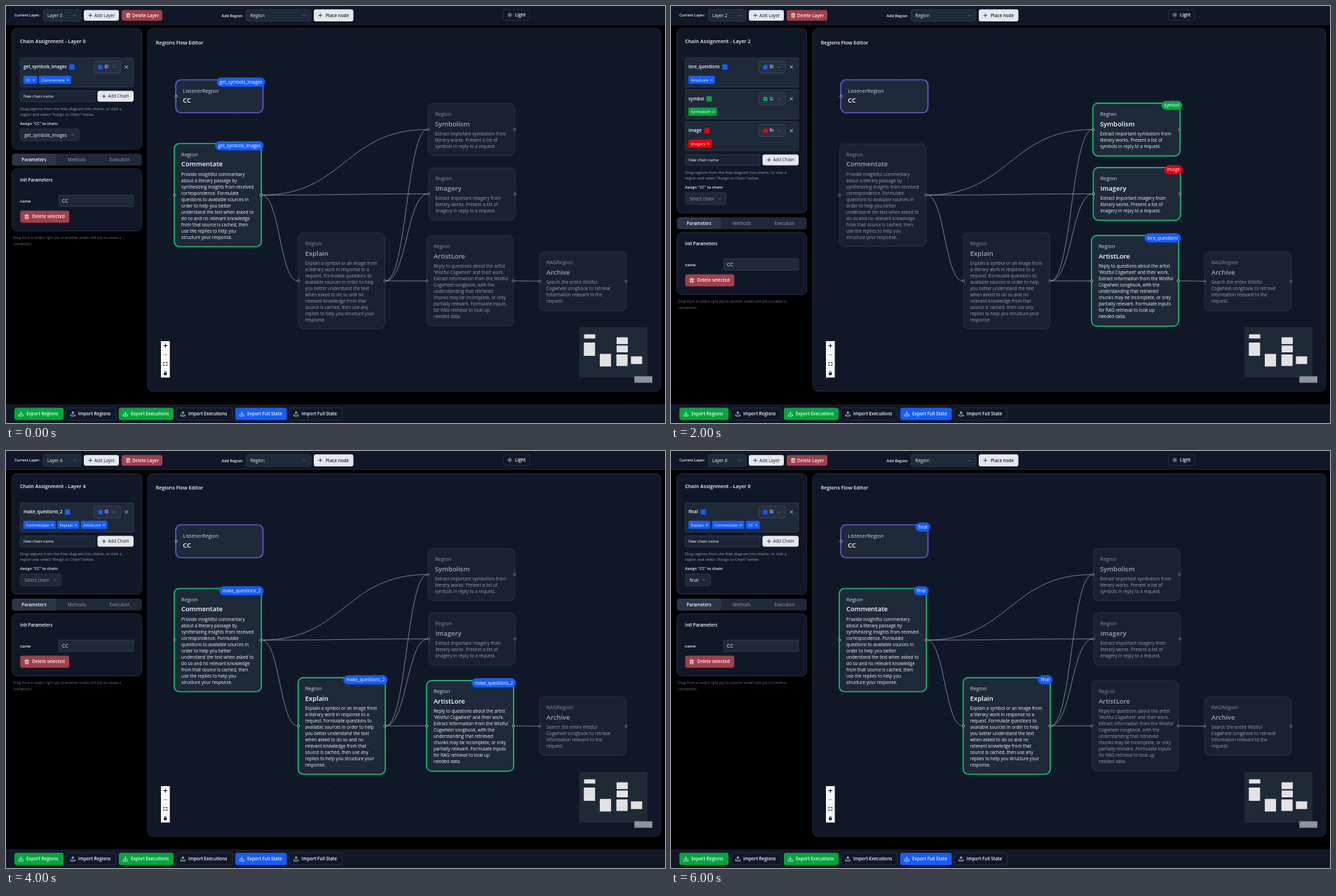
These frames come from a looping animation (940x596 px, 7 s). An HTML page with a canvas:

```html
<!DOCTYPE html>
<html lang="en">
<head>
<meta charset="utf-8">
<title>Regions Flow Editor</title>
<style>
html, body { margin: 0; width: 100%; height: 100%; overflow: hidden; background: #000; }
canvas { display: block; width: 940px; height: 596px; }
</style>
</head>
<body>
<canvas id="stage"></canvas>
<script>
const W = 940, H = 596, LAYER_MS = 1000;
const canvas = document.getElementById('stage');
const dpr = window.devicePixelRatio || 1;
canvas.width = W * dpr;
canvas.height = H * dpr;
const ctx = canvas.getContext('2d');

const C = {
  panel: '#101828', card: '#1e2939', line: '#364153', dim: '#1e2939', field: '#1b2536',
  text: '#f3f4f6', muted: '#99a1af', light: '#e5e7eb', ink: '#1a2230', danger: '#a23f4a',
  blue: '#155dfc', green: '#00a63e', red: '#e7000b', active: '#14bf6c', selected: '#5b5bd6'
};

const nodes = {
  CC: { type: 'ListenerRegion', x: 242.7, y: 106, w: 123.3, h: 46, body: [] },
  Commentate: { type: 'Region', x: 240.5, y: 197, w: 123.3, h: 146.5, body: [
    'Provide insightful commentary', 'about a literary passage by', 'synthesizing insights from received',
    'correspondence. Formulate', 'questions to available sources in', 'order to help you better',
    'understand the text when asked to', 'do so and no relevant knowledge', 'from that source is cached, then',
    'use the replies to help you', 'structure your response.'] },
  Explain: { type: 'Region', x: 417.2, y: 324.3, w: 123.3, h: 137.2, body: [
    'Explain a symbol or an image from', 'a literary work in response to a', 'request. Formulate questions to',
    'available sources in order to help', 'you better understand the text', 'when asked to do so and no',
    'relevant knowledge from that', 'source is cached, then use any', 'replies to help you structure your', 'response.'] },
  Symbolism: { type: 'Region', x: 602.3, y: 139.3, w: 123.3, h: 74.5, body: [
    'Extract important symbolism from', 'literary works. Present a list of', 'symbols in reply to a request.'] },
  Imagery: { type: 'Region', x: 602.9, y: 231.3, w: 123.3, h: 74.5, body: [
    'Extract important imagery from', 'literary works. Present a list of', 'imagery in reply to a request.'] },
  ArtistLore: { type: 'Region', x: 600.3, y: 328.6, w: 123.3, h: 128.6, body: [
    'Reply to questions about the artist', "'Wistful Cogwheel' and their work.", 'Extract information from the Wistful',
    'Cogwheel songbook, with the', 'understanding that retrieved', 'chunks may be incomplete, or only',
    'partially relevant. Formulate inputs', 'for RAG retrieval to look up', 'needed data.'] },
  Archive: { type: 'RAGRegion', x: 761.2, y: 351.4, w: 123.3, h: 83.8, body: [
    'Search the entire Wistful', 'Cogwheel songbook to retrieve', 'information relevant to the', 'request.'] }
};

const edges = [
  ['Commentate', 'Symbolism'], ['Commentate', 'Imagery'], ['Commentate', 'Explain'],
  ['Explain', 'Symbolism'], ['Explain', 'Imagery'], ['Explain', 'ArtistLore'], ['ArtistLore', 'Archive']
];

const chain = (name, color, ...regions) => ({ name, color, regions });
const layers = [
  [chain('get_symbols_images', 'blue', 'CC', 'Commentate')],
  [chain('explain_questions', 'blue', 'Explain')],
  [chain('lore_questions', 'blue', 'ArtistLore'), chain('symbol', 'green', 'Symbolism'), chain('image', 'red', 'Imagery')],
  [chain('reply', 'blue', 'Archive', 'ArtistLore', 'Explain')],
  [chain('make_questions_2', 'blue', 'Commentate', 'Explain', 'ArtistLore')],
  [chain('lore_replies', 'blue', 'Archive', 'ArtistLore'), chain('symbols_2', 'green', 'Symbolism'), chain('images_2', 'red', 'Imagery')],
  [chain('final', 'blue', 'Explain', 'Commentate', 'CC')]
];

function box(x, y, w, h, r, fill, stroke, lw = 0.6) {
  ctx.beginPath();
  ctx.roundRect(x, y, w, h, r);
  if (fill) { ctx.fillStyle = fill; ctx.fill(); }
  if (stroke) { ctx.strokeStyle = stroke; ctx.lineWidth = lw; ctx.stroke(); }
}

function setFont(size, weight = 400) {
  ctx.font = `${weight} ${size}px "Open Sans", "Noto Sans", sans-serif`;
}

function textWidth(str, size) {
  setFont(size);
  return ctx.measureText(str).width;
}

// y is the middle of the capitals; returns the text width.
function text(str, x, y, size, color = C.text, weight = 400, align = 'left') {
  setFont(size, weight);
  ctx.fillStyle = color;
  ctx.textAlign = align;
  ctx.fillText(str, x, y + size * 0.357);
  return ctx.measureText(str).width;
}

function icon(path, x, y, color, lw = 0.8, scale = 1) {
  ctx.save();
  ctx.translate(x, y);
  ctx.scale(scale, scale);
  ctx.strokeStyle = color;
  ctx.lineWidth = lw;
  ctx.lineCap = ctx.lineJoin = 'round';
  ctx.stroke(new Path2D(path));
  ctx.restore();
}

const ICON = {
  plus: 'M-2.4 0H2.4M0-2.4V2.4',
  minus: 'M-2.4 0H2.4',
  cross: 'M-1.8-1.8L1.8 1.8M1.8-1.8L-1.8 1.8',
  chevron: 'M-1.8-.9L0 .9L1.8-.9',
  trash: 'M-2.8-1.8H2.8M-1.1-1.8V-2.9H1.1V-1.8M-2.1-1.8V2.9H2.1V-1.8M-.7-.3V1.6M.7-.3V1.6',
  download: 'M0-3V1M-1.7-.7L0 1L1.7-.7M-3 1V3H3V1',
  upload: 'M0 1V-3M-1.7-1.3L0-3L1.7-1.3M-3 1V3H3V1',
  sun: 'M1.3 0A1.3 1.3 0 1 1-1.3 0A1.3 1.3 0 1 1 1.3 0M0-3V-2.5M0 3V2.5M-3 0H-2.5M3 0H2.5M-2.1-2.1L-1.8-1.8M2.1 2.1L1.8 1.8M-2.1 2.1L-1.8 1.8M2.1-2.1L1.8-1.8',
  fit: 'M-2.5-.9V-2.2H-1M1-2.2H2.5V-.9M2.5 .9V2.2H1M-1 2.2H-2.5V.9'
};

const SMALL = 15.4, LARGE = 17.3;

function button(x, mid, w, h, label, iconName, fill, fg = C.text, weight = 600, border = null) {
  box(x, mid - h / 2, w, h, 3, fill, border);
  icon(ICON[iconName], x + 9.3, mid, fg);
  text(label, x + (h === LARGE ? 17 : 15), mid, 6.3, fg, weight);
}

function select(x, y, w, label, color = C.text) {
  box(x, y, w, 17, 3, C.card, C.line);
  text(label, x + 6, y + 8.5, 6.35, color);
  icon(ICON.chevron, x + w - 9.5, y + 8.7, '#7b8493', 0.65);
}

function drawTopBar(layer) {
  box(0, 0, W, 26.5, 0, C.panel);
  box(0, 26, W, 0.8, 0, C.dim);
  text('Current Layer:', 12, 13.6, 5.3, C.text, 600);
  select(53, 5, 54, `Layer ${layer}`);
  button(111, 13.4, 50, SMALL, 'Add Layer', 'plus', C.light, C.ink, 500);
  button(165, 13.4, 58, SMALL, 'Delete Layer', 'trash', C.danger);
  text('Add Region', 307.5, 13.6, 5.5, C.text, 600);
  select(342.5, 5, 92.5, 'Region');
  button(439, 13.4, 56.5, LARGE, 'Place node', 'plus', C.light, C.ink);
  box(709.5, 5, 37.5, 15.4, 3, C.panel, C.line);
  icon(ICON.sun, 718.5, 12.8, C.text, 0.7);
  text('Light', 726, 12.8, 6.3, C.text, 600);
}

function drawBottomBar() {
  box(0, 570, W, 26, 0, C.panel);
  box(0, 569.8, W, 0.8, 0, C.dim);
  [[12, 70, 'Regions', C.green], [161, 78, 'Executions', C.green], [327, 73.5, 'Full State', C.blue]]
    .forEach(([x, w, name, fill]) => button(x, 583, w, LARGE, 'Export ' + name, 'download', fill));
  [[86, 71, 'Regions'], [243, 80, 'Executions'], [404.5, 75, 'Full State']]
    .forEach(([x, w, name]) => button(x, 583, w, LARGE, 'Import ' + name, 'upload', C.panel, C.text, 600, C.line));
}

function drawChainCard(item, y) {
  const color = C[item.color];
  box(20.3, y, 161.5, 41.5, 1, C.card, C.line, 0.8);
  const w = text(item.name, 25, y + 13, 6.3, C.text, 600);
  box(25 + w + 3.5, y + 9, 7.8, 7.8, 1.5, color);
  box(125.3, y + 4.5, 38, 17, 3, '#253043', '#465164');
  box(131.5, y + 10, 6.2, 6.2, 1.2, color);
  ctx.save();
  ctx.beginPath();
  ctx.rect(140, y, 6.3, 30);
  ctx.clip();
  text(item.color[0].toUpperCase() + item.color.slice(1), 140.8, y + 13, 6.3);
  ctx.restore();
  icon(ICON.chevron, 153.8, y + 13.2, '#7b8493', 0.65);
  icon(ICON.cross, 171.7, y + 13, C.text, 0.8);
  let x = 24.8;
  for (const region of item.regions) {
    const chipW = textWidth(region, 5.45) + 13;
    box(x, y + 25.5, chipW, 11.5, 1.5, color);
    text(region, x + 3.6, y + 31.4, 5.45, '#fff');
    icon(ICON.cross, x + chipW - 5, y + 31.7, '#fff', 1.1, 0.6);
    x += chipW + 2.3;
  }
}

function drawSidebar(layer, chains) {
  const shift = (chains.length - 1) * 45.5;
  box(8.5, 32.3, 185.2, 172.5 + shift, 7, C.panel, C.line);
  text(`Chain Assignment - Layer ${layer}`, 20, 50, 7.2, C.text, 600);
  chains.forEach((item, i) => drawChainCard(item, 74.2 + i * 45.5));

  ctx.save();
  ctx.translate(0, shift);
  box(20.3, 121.3, 106.5, 15.5, 1, C.field, C.line, 0.8);
  text('New chain name', 25, 129.2, 5.5, '#fff', 500);
  button(130.5, 129, 51.5, SMALL, 'Add Chain', 'plus', C.light, C.ink, 500);
  text('Drag regions from the flow diagram into chains, or click a', 20, 147, 5.47, C.muted);
  text('region and select "Assign to Chain" below.', 20, 154.7, 5.47, C.muted);
  text('Assign "CC" to chain:', 20, 168.2, 5.5, C.text, 600);
  const own = chains.find(item => item.regions.includes('CC'));
  const label = own ? own.name : 'Select chain';
  select(20.3, 175.8, textWidth(label, 6.35) + 23.5, label, own ? C.text : C.muted);

  box(8.5, 211, 185.2, 17, 3.5, C.card);
  box(9.2, 211.6, 61.8, 15.8, 3, '#2a3648', C.line);
  text('Parameters', 40, 219.6, 6.3, C.text, 600, 'center');
  text('Methods', 101, 219.6, 6.3, C.muted, 500, 'center');
  text('Execution', 162, 219.6, 6.3, C.muted, 500, 'center');

  box(8.5, 232.7, 185.2, 88.8, 7, C.panel, C.line);
  text('Init Parameters', 20, 249.2, 6.2, C.text, 600);
  text('name', 20, 278.8, 5.5, C.text, 600);
  box(75.3, 270.3, 106.5, 16.3, 1, C.card, C.line, 0.8);
  text('CC', 79.8, 278.8, 7.2);
  button(20.3, 301.2, 70, LARGE, 'Delete selected', 'trash', C.danger);
  text("Drag from a node's right pip to another node's left pip to create a", 10, 331.3, 5.1, '#6a7282');
  text('connection.', 10, 339.7, 5.1, '#6a7282');
  ctx.restore();
}

function drawEdge([from, to]) {
  const a = nodes[from], b = nodes[to];
  const x1 = a.x + a.w + 1, y1 = a.y + a.h / 2, x2 = b.x - 1, y2 = b.y + b.h / 2;
  const mid = (x1 + x2) / 2;
  ctx.beginPath();
  ctx.moveTo(x1, y1);
  ctx.bezierCurveTo(mid, y1, mid, y2, x2, y2);
  ctx.strokeStyle = '#b1b1b7';
  ctx.lineWidth = 0.65;
  ctx.stroke();
}

function pip(x, y) {
  ctx.beginPath();
  ctx.arc(x, y, 1.6, 0, Math.PI * 2);
  ctx.fillStyle = C.panel;
  ctx.fill();
  ctx.strokeStyle = '#fff';
  ctx.lineWidth = 0.65;
  ctx.stroke();
}

function drawNode(name, active) {
  const { type, x, y, w, h, body } = nodes[name];
  const selected = name === 'CC';
  const lit = active || selected;
  ctx.globalAlpha = lit ? 1 : 0.6;
  if (lit) box(x - 0.5, y - 0.5, w + 1, h + 1, 7.5, C.card, selected ? C.selected : C.active, 1.7);
  else box(x, y, w, h, 7, C.card, '#465164', 0.7);
  text(type, x + 9.6, y + 15.2, 7.4, '#d1d5dc');
  text(name, x + 9.6, y + 29, 9.4, '#fff', 600);
  body.forEach((row, i) => text(row, x + 9.6, y + 43.6 + i * 8.97, 6.35));
  pip(x, y + h / 2);
  if (!selected) pip(x + w, y + h / 2);
  ctx.globalAlpha = 1;
}

function drawBadge(name, item) {
  const { x, y, w } = nodes[name];
  const badgeW = textWidth(item.name, 6.4) + 8.2;
  const left = x + w + 3.7 - badgeW;
  box(left, y - 3.8, badgeW, 13, 6.5, C[item.color]);
  text(item.name, left + 4.1, y + 2.7, 6.4, '#fff');
}

function drawControls() {
  box(221, 479, 12.6, 52, 0, '#fefefe');
  [492, 505, 518].forEach(y => box(221, y - 0.3, 12.6, 0.6, 0, '#ddd'));
  icon(ICON.plus, 227.3, 485.5, '#000', 1);
  icon(ICON.minus, 227.3, 498.3, '#777', 0.8);
  icon(ICON.fit, 227.3, 511.5, '#111', 0.9);
  icon('M-1.2-.3V-1.4A1.2 1.2 0 0 1 1.2-1.4V-.3', 227.3, 524.6, '#000', 0.8);
  box(225.3, 524.2, 4, 3.2, 0.5, '#000');
}

function drawMinimap() {
  box(818, 459, 97, 72, 0, '#1f2a37');
  for (const { x, y, w, h } of Object.values(nodes)) {
    box(793.2 + x * 0.129, 455.5 + y * 0.129, w * 0.13, h * 0.13, 0.5, '#e2e2e2');
  }
  box(896.3, 529.2, 25.7, 9.3, 0, '#8b909a');
  text('React Flow', 909.2, 533.8, 4.4, '#a3a7af', 400, 'center');
}

function drawFlow(chains) {
  box(202.3, 32.3, 731.5, 518.3, 7, C.panel, C.line);
  text('Regions Flow Editor', 213.7, 52, 7.2, C.text, 600);
  ctx.fillStyle = '#323e52';
  for (let x = 222; x < 922; x += 11.23) {
    for (let y = 83; y < 538; y += 11.23) ctx.fillRect(x, y, 0.9, 0.9);
  }
  edges.forEach(drawEdge);
  const owner = name => chains.find(item => item.regions.includes(name));
  for (const name in nodes) drawNode(name, owner(name));
  for (const name in nodes) if (owner(name)) drawBadge(name, owner(name));
  drawControls();
  drawMinimap();
}

function draw(now) {
  const layer = Math.floor(now / LAYER_MS) % layers.length;
  ctx.setTransform(dpr, 0, 0, dpr, 0, 0);
  ctx.fillStyle = '#000';
  ctx.fillRect(0, 0, W, H);
  drawTopBar(layer);
  drawSidebar(layer, layers[layer]);
  drawFlow(layers[layer]);
  drawBottomBar();
}

const start = performance.now();
function tick() {
  draw(performance.now() - start);
  requestAnimationFrame(tick);
}
tick();
</script>
</body>
</html>
```
